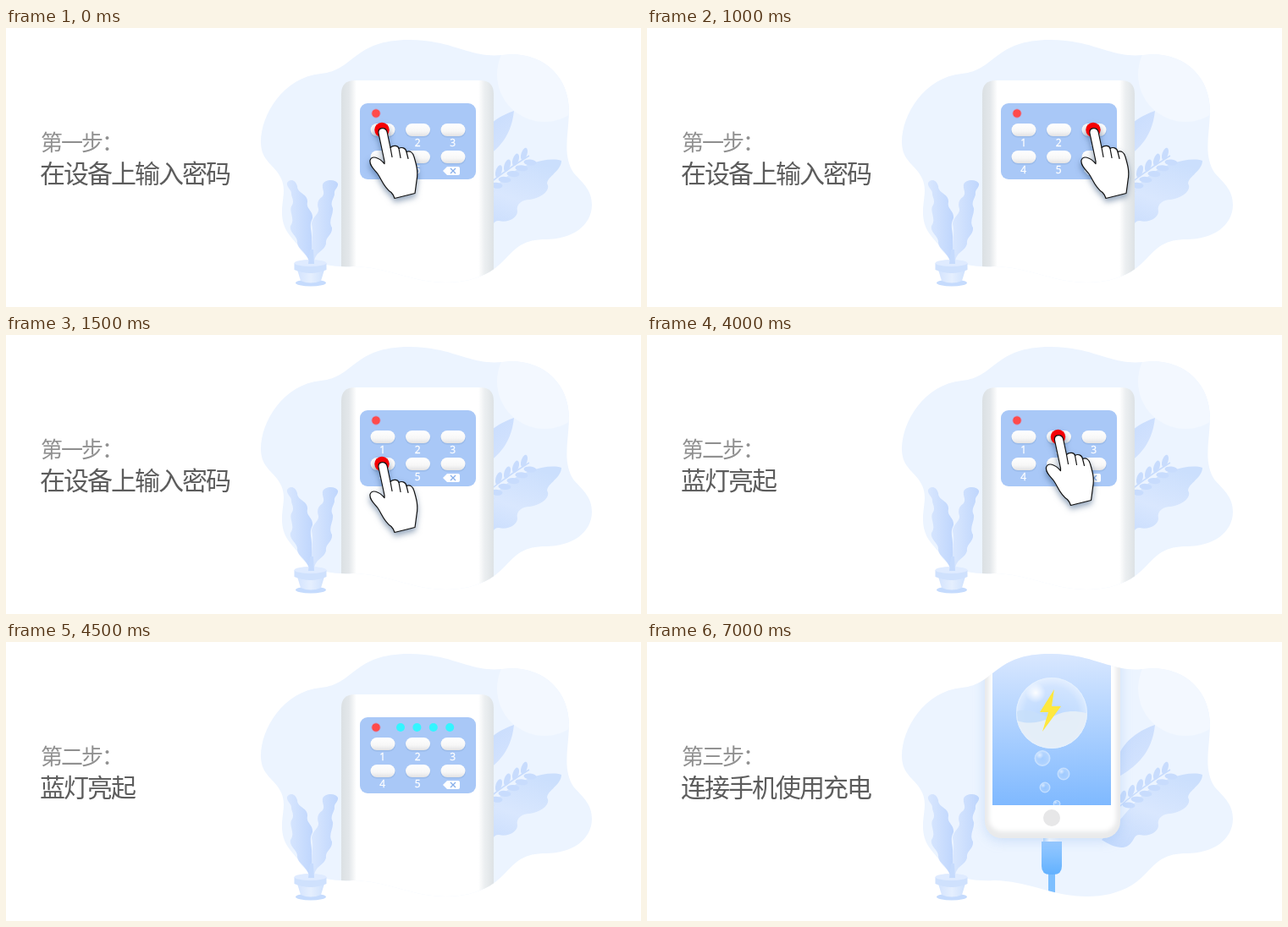
Write an HTML page that moves like this. It is 750 px wide and 330 px high and loops after 7700 ms.

```html
<!DOCTYPE html>
<html lang="zh-CN">
<head>
<meta charset="utf-8">
<title>充电步骤</title>
<style>
html, body { margin: 0; width: 100%; height: 100%; overflow: hidden; background: #fff; }
svg { display: block; width: 750px; height: 330px; }
.cjk { font-family: "Noto Sans CJK SC", "Noto Sans CJK", sans-serif; letter-spacing: -2px; }
.num { font: 12px "Open Sans", "Noto Sans", sans-serif; fill: #fff; text-anchor: middle; stroke: #fff; stroke-width: .3px; }
#hand { filter: drop-shadow(0 4px 3.5px rgba(40, 75, 120, .5)); }
#phone { filter: drop-shadow(0 3px 7px rgba(120, 170, 235, .28)); }
</style>
</head>
<body>
<svg viewBox="0 0 750 330">
  <defs>
    <path id="blob" d="M301 135C301 102 328 58 372 54C412 50 410 14 476 14C528 14 548 36 586 32C632 26 666 56 665 100C664 128 657 152 671 172C682 184 692 192 692 209C692 234 668 250 638 250C598 250 598 272 572 288C556 297 540 301 519 301C480 301 452 283 410 282C370 284 352 272 344 256C336 246 326 238 326 218C326 202 331 192 325 178C318 162 301 158 301 135Z"/>
    <clipPath id="inBlob"><use href="#blob"/></clipPath>
    <clipPath id="inScreen"><path d="M408 0H548V193H408Z"/></clipPath>
    <clipPath id="inBall"><circle cx="478" cy="84" r="42"/></clipPath>
    <linearGradient id="leaf" x2=".6" y2="1">
      <stop stop-color="#c6dbfd"/><stop offset="1" stop-color="#d5e4fe"/>
    </linearGradient>
    <linearGradient id="stalk" x2="1">
      <stop stop-color="#d9e7fe"/><stop offset="1" stop-color="#bfd6fd"/>
    </linearGradient>
    <linearGradient id="wavy" x1=".2" y1="1" x2=".7" y2="0">
      <stop stop-color="#c6dbfd"/><stop offset=".5" stop-color="#d9e7fe"/><stop offset="1" stop-color="#cbdffd"/>
    </linearGradient>
    <linearGradient id="pot" x2="1">
      <stop stop-color="#d3e3fe"/><stop offset=".5" stop-color="#e5effe"/><stop offset="1" stop-color="#cfe1fd"/>
    </linearGradient>
    <linearGradient id="case" x2="1">
      <stop stop-color="#dbe0e3"/><stop offset=".05" stop-color="#e3e7ea"/><stop offset=".1" stop-color="#fff"/>
      <stop offset=".9" stop-color="#fff"/><stop offset=".94" stop-color="#eceff1"/><stop offset="1" stop-color="#dde2e5"/>
    </linearGradient>
    <linearGradient id="key" x2="0" y2="1">
      <stop stop-color="#fff"/><stop offset=".6" stop-color="#f7f7f7"/><stop offset="1" stop-color="#e2e2e4"/>
    </linearGradient>
    <linearGradient id="screen" gradientUnits="userSpaceOnUse" x1="0" y1="15" x2="0" y2="193">
      <stop stop-color="#d8e7ff"/><stop offset="1" stop-color="#7fb9ff"/>
    </linearGradient>
    <linearGradient id="plug" x2="1">
      <stop stop-color="#b5d8ff"/><stop offset=".35" stop-color="#fff"/><stop offset="1" stop-color="#e8f2ff"/>
    </linearGradient>
    <linearGradient id="body" x2="0" y2="1">
      <stop stop-color="#98caff"/><stop offset="1" stop-color="#62b1ff"/>
    </linearGradient>
    <radialGradient id="glass">
      <stop stop-color="#fff" stop-opacity=".12"/><stop offset=".75" stop-color="#fff" stop-opacity=".22"/><stop offset="1" stop-color="#fff" stop-opacity=".5"/>
    </radialGradient>
    <radialGradient id="shine">
      <stop stop-color="#fff" stop-opacity=".95"/><stop offset="1" stop-color="#fff" stop-opacity="0"/>
    </radialGradient>
    <filter id="soft"><feGaussianBlur stdDeviation="2.5"/></filter>
  </defs>

  <use href="#blob" fill="#ecf4ff"/>
  <circle cx="636" cy="55" r="56" fill="#f3f8ff" clip-path="url(#inBlob)"/>

  <g fill="url(#leaf)">
    <path d="M600 98C597 124 586 143 556 160C548 132 570 108 600 98Z"/>
    <path d="M656 157C642 152 610 160 590 177C573 190 556 216 537 234C548 241 560 246 568 241C576 236 574 228 582 228C592 231 604 225 604 217C602 208 610 203 618 203C629 202 642 194 640 186C635 178 656 170 656 157Z" fill="url(#wavy)"/>
    <g id="fern"><path d="M552 200Q580 174 618 151" fill="none" stroke="#c8dcfd" stroke-width="1.5"/></g>
  </g>
  <g fill="url(#stalk)">
    <path d="M332 183C335 178 342 179 344 187C344 196 357 196 356 206C354 214 363 216 362 225C357 235 362 240 361 250L362 276H358C354 264 345 262 344 254C345 246 334 242 336 234C342 226 334 218 337 211C342 204 336 199 337 195C336 190 331 188 332 183Z"/>
    <path d="M392 184C389 178 376 179 374 185C373 191 377 194 374 199C368 203 367 208 369 214C370 220 361 224 361 232C364 242 360 250 361 276H364C366 264 376 264 378 255C377 247 386 245 385 236C380 228 387 221 386 213C382 206 388 201 388 196C387 191 393 189 392 184Z"/>
  </g>
  <ellipse cx="360" cy="301.500" rx="18" ry="4" fill="#c5dbfd"/>
  <path d="M344 286H376L372 299Q360 304 348 299Z" fill="url(#pot)"/>
  <path d="M340.500 278V286Q360 294 378.500 286V278Z" fill="#cfe1fd"/>
  <ellipse cx="359.500" cy="278" rx="19" ry="4" fill="#dfebff"/>
  <path d="M357 279L359 262H363L364 279Z" fill="#c6dbfd"/>

  <g id="device">
    <path d="M396 320V78Q396 62 412 62H560Q576 62 576 78V320Z" fill="url(#case)" clip-path="url(#inBlob)"/>
    <rect x="418" y="89" width="137" height="90" rx="9" fill="#a9c8f7"/>
    <circle cx="437" cy="101" r="5.200" fill="#ff4b4b" stroke="#bfa9d6" stroke-width=".8"/>
    <g id="keys"></g>
    <path d="M516 169L521 164H534Q536 164 536 166V172Q536 174 534 174H521Z" fill="#fff"/>
    <path d="M525 166L531 172M531 166L525 172" stroke="#86aeea" stroke-width="1.300"/>
    <g id="lights" fill="#33f5ff"></g>
  </g>

  <g id="hand">
    <circle cy="0" r="8.700" fill="#f50005"/>
    <path d="M3 37L-4 4C-5 -3 4 -4 6 2L10 21C13 18 19 18 20 22C23 20 28 21 29 26C33 24 37 27 38 32C41 42 43 50 41 60Q40 68 39 75L15 81Q14 77 11 74C2 68 0 59 -5 52C-9 47 -15 42 -14 36C-12 30 -4 32 3 40Z" fill="#fff" stroke="#111" stroke-width="1.200" stroke-linejoin="round"/>
    <path d="M10 21L12 32M20 22L22 33M29 26L31 34" fill="none" stroke="#111" stroke-width="1.200" stroke-linecap="round"/>
  </g>

  <g id="charge" clip-path="url(#inBlob)">
    <g id="cable">
      <path d="M474 310H482V360H474Z" fill="#7dbfff"/>
      <path d="M468 276V257Q468 253 472 253H484Q488 253 488 257V276Z" fill="url(#plug)"/>
      <path d="M472 259H484V265H472Z" fill="#ffe27a"/>
      <path d="M466 275H490V304Q490 314 480 314H476Q466 314 466 304Z" fill="url(#body)"/>
    </g>
    <g id="phone">
      <rect x="399" y="-20" width="160" height="252" rx="20" fill="#e9eaeb"/>
      <rect x="404" y="-20" width="150" height="244" rx="15" fill="#fff" filter="url(#soft)"/>
      <path d="M408 0H548V193H408Z" fill="url(#screen)"/>
    </g>
    <g id="power">
      <circle cx="478" cy="208" r="10" fill="#e7e7e8"/>
      <circle cx="478" cy="84" r="42" fill="url(#glass)"/>
      <g clip-path="url(#inBall)">
        <path d="M434 83C448 77 462 84 476 90C492 97 506 92 522 84V130H434Z" fill="#c9e0fb" opacity=".8"/>
        <path d="M434 92C450 98 464 96 478 89C494 80 508 81 522 85V130H434Z" fill="#e8f0f8" opacity=".9"/>
      </g>
      <circle cx="478" cy="84" r="41.500" fill="none" stroke="#e6f2ff" opacity=".7"/>
      <circle cx="459" cy="60" r="12" fill="url(#shine)"/>
      <path d="M481 56L464 83H474L467 106L489 76H478Z" fill="#ffe83f"/>
      <g id="bubbles" clip-path="url(#inScreen)"></g>
    </g>
  </g>

  <text id="step" class="cjk" x="41" y="145" font-size="26" fill="#909090"></text>
  <text id="title" class="cjk" x="40" y="183" font-size="30" fill="#5c5c5c"></text>
</svg>
<script>
const $ = id => document.getElementById(id);
const add = (id, markup) => $(id).insertAdjacentHTML('beforeend', markup);
const show = (id, on) => $(id).style.display = on ? '' : 'none';

const keys = [445, 486.5, 528].map(x => [x, 121]);
keys.push(...keys.map(([x]) => [x, 153]));
keys.forEach(([x, y], i) => {
  add('keys', `<rect x="${x - 15}" y="${y - 7.5}" width="30" height="16" rx="8" fill="#8badde" opacity=".5"/>
    <rect x="${x - 14.5}" y="${y - 8}" width="29" height="15" rx="7.5" fill="url(#key)"/>`);
  if (i < 5) add('keys', `<text class="num" x="${x - .3}" y="${y + 19.2}">${i + 1}</text>`);
});

for (let i = 0; i < 4; i++)
  add('lights', `<circle cx="${466 + i * 19.4}" cy="101" r="5"/>`);

for (let i = 0; i < 6; i++) {
  const x = 563 + i * 10, y = 190 - i * 6.8;
  for (const [dx, dy, turn] of [[-1, -7, -72], [6, 3, 5]])
    add('fern', `<ellipse rx="7.5" ry="3.5" fill="#c8dcfd" transform="translate(${x + dx} ${y + dy}) rotate(${turn})"/>`);
}

for (const [x, y, r] of [[467, 137.5, 9], [492, 156, 7], [470, 172, 6], [484, 191.5, 4]])
  add('bubbles', `<circle cx="${x}" cy="${y}" r="${r}" fill="url(#glass)" stroke="#cfe5ff" stroke-width=".8"/>
    <circle cx="${x - r * .35}" cy="${y - r * .4}" r="${r * .5}" fill="url(#shine)" opacity=".6"/>`);

const steps = [['第一步：', '在设备上输入密码'], ['第二步：', '蓝灯亮起'], ['第三步：', '连接手机使用充电']];
// start time, step, pressed key (0 for none)
const scenes = [
  [0, 0, 1], [500, 0, 2], [1000, 0, 3], [1500, 0, 4], [2000, 0, 5],
  [4000, 1, 2], [4500, 1, 0], [6500, 2, 0], [7000, 2, 0]
];
let current;

function draw(now) {
  const t = now % 7700;
  const scene = scenes.findLast(s => s[0] <= t);
  if (scene !== current) {
    current = scene;
    const [start, step, key] = scene;
    const plugged = start === 7000;
    $('step').textContent = steps[step][0];
    $('title').textContent = steps[step][1];
    show('device', step < 2);
    show('lights', step === 1 && !key);
    show('hand', key);
    if (key) {
      const [x, y] = keys[key - 1];
      $('hand').setAttribute('transform', `translate(${x - 1} ${y - .5})`);
    }
    show('charge', step === 2);
    show('power', plugged);
    $('cable').setAttribute('transform', `translate(0 ${plugged ? -39 : 0})`);
  }
  requestAnimationFrame(draw);
}
draw(performance.now());
</script>
</body>
</html>
```
